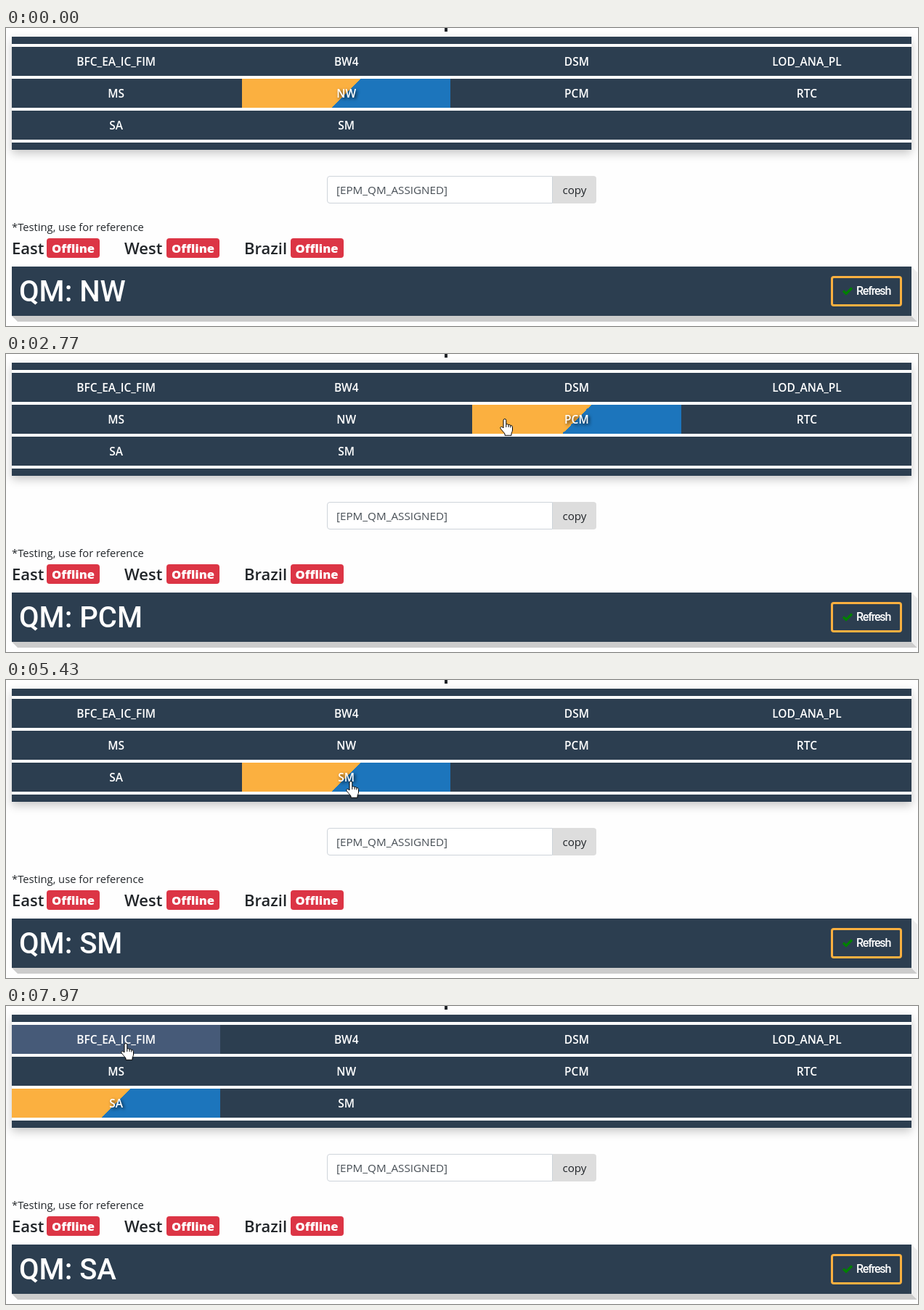
Recreate the animation shown at these times as an HTML page. Size 1256 by 411 pixels, loop 8000 ms.

```html
<!DOCTYPE html>
<html lang="en">
<head>
<meta charset="utf-8">
<title>Queue picker</title>
<style>
html, body { margin: 0; width: 1256px; height: 411px; overflow: hidden; background: #fefefe; }
body { position: relative; font: 15.2px/24px "Open Sans", "Noto Sans", sans-serif; color: #212529; }
body * { position: absolute; box-sizing: border-box; white-space: nowrap; }
.heading { left: 604px; top: 0; width: 4px; height: 5px; background: #212529; }
.table { left: 8px; top: 12px; width: 1239px; height: 156px; background: #fff; box-shadow: 0 5px 12px rgba(0,0,0,.22); }
.row { left: 0; width: 100%; height: 40px; background: #2c3e50; }
.edge { height: 10px; }
.cell { top: 0; height: 40px; font-size: 15.5px; line-height: 40px; font-weight: 600; color: #fff; text-align: center; }
.hover { background: #465a78; }
.active { background: linear-gradient(135deg, #fbb040 50%, #1c75bc 50%); text-shadow: 2px 2px 4px rgba(0,0,0,.75); }
.field, .copy { top: 204px; height: 38px; line-height: 36px; }
.field { left: 442px; width: 311px; padding-left: 12px; border: 1px solid #ced4da; border-radius: 4px 0 0 4px; background: #fff; color: #495057; }
.copy { left: 753px; width: 60px; line-height: 38px; background: #ddd; border-radius: 0 4px 4px 0; text-align: center; }
.note { left: 8px; top: 262.3px; font-size: 14.75px; }
.site { top: 290.5px; font-size: 22px; font-weight: 600; }
.badge { top: 290px; width: 73px; height: 27px; border-radius: 4px; background: #dc3545; color: #fff; font-size: 16.6px; line-height: 28px; font-weight: 800; text-align: center; }
.bar { left: 8px; top: 329px; width: 1239px; height: 68px; background: #2c3e50; color: #fff; font-family: Roboto, sans-serif; font-weight: 500; }
#title { left: 10px; top: 1px; font-size: 40px; line-height: 68px; }
.refresh { left: 1128px; top: 13px; width: 98px; height: 42px; border: 3px solid #fbb040; border-radius: 4px; font-size: 16px; line-height: 36px; letter-spacing: -1.2px; padding-left: 32px; }
svg { left: 0; top: 0; }
</style>
</head>
<body>
<div class="heading"></div>
<div class="table" id="table">
  <div class="row edge" style="top:0"></div>
  <div class="row edge" style="top:146px"></div>
</div>
<div class="field">[EPM_QM_ASSIGNED]</div>
<div class="copy">copy</div>
<div class="note">*Testing, use for reference</div>
<div class="site" style="left:8px">East</div><div class="badge" style="left:56px">Offline</div>
<div class="site" style="left:163px">West</div><div class="badge" style="left:221px">Offline</div>
<div class="site" style="left:328px">Brazil</div><div class="badge" style="left:391.5px">Offline</div>
<div class="bar"><div id="title"></div><div class="refresh">Refresh</div></div>
<svg width="1256" height="411">
  <path d="M8 397l8 8H1255l-8-8Z" fill="#ccc"/>
  <path d="M1247 329l8 8V405l-8-8Z" fill="#eee"/>
  <path d="M1153 362.5l4 4 8-8" fill="none" stroke="green" stroke-width="3.2"/>
  <g fill="#fff" stroke="#000" stroke-linejoin="round">
    <path id="arrow" d="M.5.5V16.5l3.7-3.5 2.4 5.5 2.3-1-2.4-5.3h5Z"/>
    <path id="hand" d="M-1 13V2.5a1.9 1.9 0 0 1 3.8 0V8.5c.6-1.2 3.1-1 3.3.5.8-1 2.8-.5 2.8.9 1-.5 2.6 0 2.6 1.5V16c0 2-1.5 3.5-1.5 5v2.3H1V21C-.5 19-3.5 16-5 13.6c-.8-1.7 1.2-3 2.6-1.7ZM2.8 8.5V12M6.1 9V12M8.9 10V12.5"/>
  </g>
</svg>
<script>
const LOOP = 8000, TICK = 76.7;
const PITCH = 317.1, WIDTH = 287.35, HEIGHT = 40;
const ROWS = [["BFC_EA_IC_FIM", "BW4", "DSM", "LOD_ANA_PL"], ["MS", "NW", "PCM", "RTC"], ["SA", "SM"]];
const CLICKS = [[0, "NW"], [2770, "PCM"], [5430, "SM"], [7280, "SA"]];
// Pointer moves: start, end, then points on a smooth path, evenly spaced in time
const MOVES = [
  [370, 750, [1032, 404], [840, 325], [707, 285]],
  [1210, 2300, [705, 283], [661, 222], [599, 141], [632, 107], [686, 89]],
  [3000, 3690, [678, 91], [575, 121], [480, 138]],
  [4410, 4480, [477, 139], [474, 139]],
  [5660, 6580, [468, 140], [365, 146], [234, 145], [177, 144]],
  [7430, 7970, [177, 140], [170, 86], [164, 51]]
];
const $ = id => document.getElementById(id);

function add(parent, cls, style, text = "") {
  const el = document.createElement("div");
  el.className = cls;
  el.style.cssText = style;
  el.textContent = text;
  return parent.appendChild(el);
}

const cells = ROWS.flatMap((names, r) => {
  const row = add($("table"), "row", `top:${14 + 44 * r}px`);
  return names.map((name, c) => ({
    name, x: 8 + PITCH * c, y: 26 + 44 * r,
    el: add(row, "cell", `left:${PITCH * c}px;width:${WIDTH}px`, name)
  }));
});

// Catmull-Rom curve through pts, u from 0 to 1
function along(pts, u) {
  const last = pts.length - 1;
  const i = Math.min(last - 1, Math.floor(u * last));
  const t = u * last - i;
  const [a, b, c, d] = [i - 1, i, i + 1, i + 2].map(k => pts[Math.max(0, Math.min(last, k))]);
  return [0, 1].map(k => Math.round((2 * b[k] + (c[k] - a[k]) * t
    + (2 * a[k] - 5 * b[k] + 4 * c[k] - d[k]) * t ** 2
    + (3 * b[k] - a[k] - 3 * c[k] + d[k]) * t ** 3) / 2));
}

// The pointer was sampled at a fixed rate, so it moves in whole ticks
function pointer(time) {
  const move = MOVES.findLast(m => m[0] <= time);
  if (!move) return null;
  const [start, end, ...pts] = move;
  const steps = Math.round((end - start) / TICK);
  const step = Math.floor((time - start + 5) / (end - start) * steps);
  return along(pts, Math.min(1, step / steps));
}

function draw(now) {
  const time = now % LOOP;
  const active = CLICKS.findLast(c => c[0] <= time)[1];
  const pos = pointer(time);
  const over = pos && cells.find(c =>
    pos[0] >= c.x && pos[0] < c.x + WIDTH && pos[1] >= c.y && pos[1] < c.y + HEIGHT);
  for (const c of cells)
    c.el.className = "cell" + (c.name === active ? " active" : c === over ? " hover" : "");
  $("title").textContent = "QM: " + active;
  for (const id of ["arrow", "hand"]) {
    const shown = pos && (id === "hand") === !!over;
    $(id).style.display = shown ? "" : "none";
    if (shown) $(id).setAttribute("transform", `translate(${pos})`);
  }
  requestAnimationFrame(draw);
}
draw(performance.now());
</script>
</body>
</html>
```
